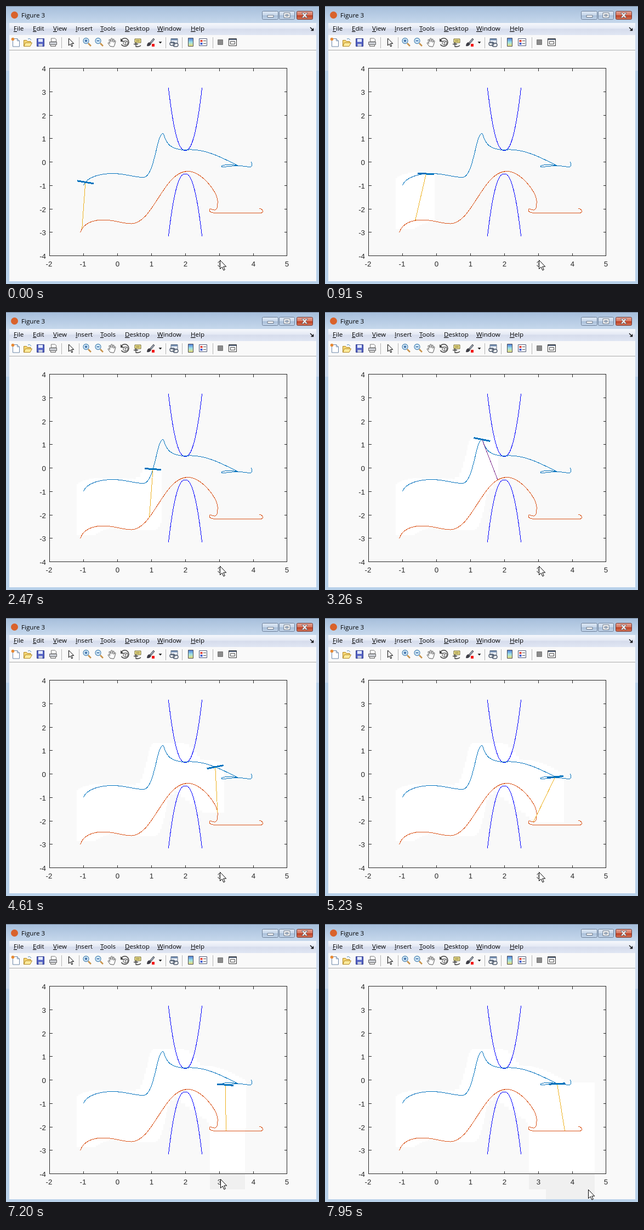
Write an HTML page that moves like this. It is 571 px wide and 507 px high and loops after 8000 ms.

```html
<!DOCTYPE html>
<html lang="en">
<head>
<meta charset="utf-8">
<title>Figure 3</title>
<style>
  html, body { margin: 0; width: 100%; height: 100%; overflow: hidden; background: #b9d1ea; }
  svg { display: block; width: 571px; height: 507px; }
  .ui { font: 11.6px "Open Sans", "Noto Sans", sans-serif; fill: #000; }
  .ui tspan { text-decoration: underline; }
  .tick { font: 13.3px "Liberation Sans", Arial, sans-serif; fill: #262626; }
  .crisp { shape-rendering: crispEdges; }
  .line { fill: none; stroke-width: 1; }
</style>
</head>
<body>
<svg id="stage" viewBox="0 0 571 507" xmlns="http://www.w3.org/2000/svg">
  <defs>
    <linearGradient id="title" x2="0" y2="1">
      <stop offset="0" stop-color="#a6bedb"/><stop offset="1" stop-color="#c6d8ec"/>
    </linearGradient>
    <linearGradient id="menu" x2="0" y2="1">
      <stop offset="0" stop-color="#f6f8fc"/><stop offset=".45" stop-color="#e4e9f4"/>
      <stop offset=".5" stop-color="#d6dcec"/><stop offset="1" stop-color="#e0e6f3"/>
    </linearGradient>
    <linearGradient id="glass" x2="0" y2="1">
      <stop offset="0" stop-color="#dfe9f5"/><stop offset=".48" stop-color="#c6d6e9"/>
      <stop offset=".52" stop-color="#a9bfd9"/><stop offset="1" stop-color="#c3d5ea"/>
    </linearGradient>
    <linearGradient id="close" x2="0" y2="1">
      <stop offset="0" stop-color="#e7a597"/><stop offset=".48" stop-color="#d37660"/>
      <stop offset=".52" stop-color="#bd3e22"/><stop offset="1" stop-color="#d4765a"/>
    </linearGradient>
    <linearGradient id="bar" x2="0" y2="1">
      <stop offset="0" stop-color="#4a78d8"/><stop offset=".5" stop-color="#9be0e8"/>
      <stop offset="1" stop-color="#f0e070"/>
    </linearGradient>
    <clipPath id="client"><path d="M6 81H566V502H6z"/></clipPath>
    <clipPath id="box"><path d="M79 113H513V456H79z"/></clipPath>
  </defs>

  <!-- window -->
  <path fill="#b9d1ea" d="M0 0H571V507H0z"/>
  <path fill="#cddbee" d="M0 30H6V118H0zM566 30h5V118h-5z"/>
  <path fill="url(#title)" d="M0 0H571V31H0z"/>
  <path fill="#6f7f92" d="M0 0H571V1H0z"/>
  <circle cx="15.5" cy="16.5" r="6.5" fill="#d9622b"/>
  <text class="ui" x="28" y="21">Figure 3</text>
  <g stroke="#6d7f98">
    <rect x="467.5" y="9.5" width="29" height="15" rx="2" fill="url(#glass)"/>
    <rect x="498.5" y="9.5" width="28" height="15" rx="2" fill="url(#glass)"/>
    <rect x="530.5" y="9.5" width="29" height="15" rx="2" fill="url(#close)" stroke="#713a35"/>
  </g>
  <g fill="#fff" stroke="#4b5668" stroke-width=".8">
    <path d="M477 17h11v3.5h-11z"/>
    <path fill-rule="evenodd" d="M507 12.5h11v9h-11zM510 15.5v3h5v-3z"/>
    <path d="M539.5 12.5h3.4l2 2.4 2-2.4h3.4l-3.6 4.4 3.6 4.4h-3.4l-2-2.4-2 2.4h-3.4l3.6-4.4z"/>
  </g>
  <path fill="url(#menu)" d="M6 31H566V53H6z"/>
  <path fill="#f9f9f9" d="M6 53H566V502H6z"/>
  <path fill="#a9a9a9" d="M6 80H566V81H6z"/>
  <g id="menus" class="ui"></g>
  <path d="M555 39l5 5M560.5 40.5v4h-4" fill="none" stroke="#000" stroke-width="1.3"/>

  <!-- toolbar -->
  <path class="crisp line" stroke="#b4b4b4" d="M101.5 57v20M133.5 57v20M291.5 57v20M321.5 57v20M377.5 57v20"/>
  <g stroke-linejoin="round">
    <path d="M12.5 59.5h8l4 4v10.5h-12z" fill="#fff" stroke="#6d87a8"/>
    <path d="M20.5 59.5v4h4" fill="none" stroke="#6d87a8"/>
    <circle cx="12.5" cy="60.5" r="2.8" fill="#e78a35"/>
    <path d="M32.5 73.5v-11h5l1.5 2h6v3" fill="#f7d774" stroke="#b08725"/>
    <path d="M32.5 73.5l3-6.5h12l-3.5 6.5z" fill="#ffeb9c" stroke="#b08725"/>
    <path d="M40 60q4-2 6 2" fill="none" stroke="#4d87b8"/>
    <path d="M56.5 59.5h13v14h-13z" fill="#5462c4" stroke="#2d3887"/>
    <path d="M59 60h8v5.5h-8z" fill="#e5ecff"/><path d="M59.5 69h7v4.5h-7z" fill="#c9cfdf"/>
    <path d="M82.5 65v-6h7l2 2v4z" fill="#fff" stroke="#777"/>
    <path d="M79.5 65.5h13v5h-13z" fill="#c9ccd2" stroke="#666"/>
    <path d="M81.5 70.5h9v3h-9z" fill="#eee" stroke="#666"/>
    <path d="M114.5 59v13l3-2.8 2.3 4.8 1.9-.9-2.3-4.7h4.3z" fill="#fff" stroke="#000"/>
  </g>
  <g fill="none">
    <path d="M150 68l5 5M172 68l5 5" stroke="#c8924a" stroke-width="2.6"/>
    <g fill="#d7edfb" stroke="#5a8db8" stroke-width="1.3"><circle cx="146" cy="63.5" r="5"/><circle cx="168" cy="63.5" r="5"/></g>
    <path d="M143.5 63.5h5M146 61v5M165.5 63.5h5" stroke="#245a9a" stroke-width="1.5"/>
    <path d="M190 73.5l-4-6q1-2 3.5 1l-1.5-7q1.5-1.5 2.5 1l1 3v-6q1.5-1.5 2.5 0l.3 6 1-5q1.5-1 2 .8l-.5 5 1.7-3q1.5-.5 1.5 1l-2 7-1.5 3z" fill="#fff" stroke="#555"/>
    <path d="M211 61.5a7.3 7.3 0 1 1 -.5 8.5" stroke="#444" stroke-width="1.6"/>
    <path d="M209 59v6h6z" fill="#444"/>
    <path d="M214 64.5l4-1.5 4 1.5v4.5l-4 2-4-2zM214 64.5l4 1.5 4-1.5M218 66v5" stroke="#555"/>
    <path d="M235 60h11v7h-11z" fill="#f7e98d" stroke="#6b6330"/>
    <path d="M237 62.5h7M237 64.5h7" stroke="#6b6330" stroke-width=".8"/>
    <path d="M233 69.5h8M237 66v8q6 1 9-2" stroke="#333" stroke-width="1.3"/>
    <path d="M263 66l6-7 2 2-6 7z" fill="#9aa5b6" stroke="#444"/>
    <path d="M257 73q0-6 5-7l3 3q-2 5-8 4z" fill="#3d3d46"/>
    <path d="M266 69h5v5h-5z" fill="#f21818"/>
    <path d="M278.5 65h6l-3 3.5z" fill="#222"/>
    <path d="M301 59.5h12v8h-12z" fill="#e9eef6" stroke="#59687d"/><path d="M301 60h12v2.5h-12z" fill="#6e89ad"/>
    <path d="M299 69q0-3 3-3h3q3 0 3 3t-3 3h-3q-3 0-3-3M305 71q0-3 3-3h3q3 0 3 3t-3 3h-3q-3 0-3-3" stroke="#4f5b6d" stroke-width="1.4"/>
    <path d="M332.5 58.5h9v15h-9z" fill="url(#bar)" stroke="#4d4d55"/>
    <path d="M352.5 59.5h14v13h-14z" fill="#fff" stroke="#4e5876"/>
    <path d="M354.5 62h4v3.5h-4z" fill="#e03c31"/><path d="M354.5 67h4v3.5h-4z" fill="#3858cf"/>
    <path d="M360 63.5h5M360 68.5h5" stroke="#555"/>
    <path d="M386.5 61.5h9v9h-9z" fill="#8b8b8b" stroke="#777"/>
    <path d="M406.5 59.5h14v13h-14z" fill="#fff" stroke="#333"/>
    <path d="M407 60h13v2h-13z" fill="#56657d"/>
    <path d="M409.5 64.5h8v5h-8z" stroke="#444"/>
  </g>

  <!-- figure -->
  <g class="crisp">
    <path id="greyTrail" fill="#f0f0f0" clip-path="url(#client)"/>
    <path id="whiteTrail" fill="#fff" clip-path="url(#box)"/>
    <path id="axes" class="line" stroke="#262626"/>
  </g>
  <g id="labels" class="tick"></g>
  <g class="crisp" transform="translate(.5 .5)">
    <path id="walls" class="line" stroke="#00f"/>
    <path id="craftPath" class="line" stroke="#0072bd"/>
    <path id="loadPath" class="line" stroke="#d95319"/>
    <path id="cable" class="line"/>
    <path id="craft" fill="none" stroke="#0072bd" stroke-width="3"/>
  </g>
  <path id="pointer" d="M.5.5v16l3.7-3.5 2.7 6 2.4-1.1-2.6-5.7h5z" fill="#fff" stroke="#000"/>
</svg>
<script>
const $ = id => document.getElementById(id);
const set = (id, name, value) => $(id).setAttribute(name, value);
const LOOP = 8000, FIRST = 120, GAP = 105.4, LAST = 75;
const UNIT_X = 61.857, UNIT_Y = 42.75;

// menu bar
$("menus").innerHTML = [["File", 14], ["Edit", 49], ["View", 86], ["Insert", 127],
  ["Tools", 172], ["Desktop", 217], ["Window", 276], ["Help", 337]]
  .map(([s, x]) => `<text x="${x}" y="45"><tspan>${s[0]}</tspan>${s.slice(1)}</text>`).join("");

// axes
let frame = "M79.5 113.5H512.5V455.5H79.5Z", labels = "";
for (let x = -2; x <= 5; x++) {
  const p = Math.round(79.4 + UNIT_X * (x + 2)) + .5;
  frame += `M${p} 113.5v5M${p} 455.5v-5`;
  labels += `<text x="${p - (x < 0 ? 1 : 0)}" y="474.5" text-anchor="middle">${x}</text>`;
}
for (let y = -4; y <= 4; y++) {
  const p = Math.floor(113.5 + UNIT_Y * (4 - y)) + .5;
  frame += `M79.5 ${p}h5M512.5 ${p}h-5`;
  labels += `<text x="73" y="${p + 5}" text-anchor="end">${y}</text>`;
}
set("axes", "d", frame);
$("labels").innerHTML = labels;

// the two walls of the gap
const wall = (base, dir) => "M" + Array.from({ length: 41 }, (_, i) => {
  const s = i / 20 - 1;
  return `${326.5 + 30.6 * s} ${base + dir * 114 * Math.abs(s) ** 2.3}`;
}).join("L");
set("walls", "d", wall(263, -1) + wall(305.5, 1));

// a chain of cubic curves; knots give the step at which each curve begins
function track(id, d, knots) {
  set(id, "d", d);
  const n = d.match(/[\d.]+/g).map(Number);
  return step => {
    let i = 0;
    while (i < knots.length - 2 && step > knots[i + 1]) i++;
    const t = (step - knots[i]) / (knots[i + 1] - knots[i]), u = 1 - t;
    return [0, 1].map(k => {
      const [a, b, c, e] = [0, 2, 4, 6].map(j => n[6 * i + j + k]);
      return u * u * u * a + 3 * u * u * t * b + 3 * u * t * t * c + t * t * t * e;
    });
  };
}

const craftAt = track("craftPath",
  `M141 326.5 C147 311 172 305 195 305 C217 305 233 312 250 312
   C271 312 274 232 286 232 C290 232 286 262 327 262
   C362 257.5 400 279.5 422 290.5 C421 290 398 287 392.5 291.5
   C392 295 405 291 423 291 C433 291 440 293 445 293 C448 293 449.5 289 447 284`,
  [-1.5, 9.8, 18.7, 30, 36, 49.5, 62, 75]);

const loadAt = track("loadPath",
  `M135 413 C140 396 158 389.5 177 389.5 C197 389.5 212 396.5 228 396.5
   C268 396.5 287 301 331 301 C356 301 384 337 385.5 354
   C387 386 371 363 370.5 371.5 C370 378 385 377.5 401 377
   C413 376.5 425 376.5 437 376.5 C446 376.5 455 377 463 377 C472 377 468 369 461 369`,
  [-2, 11, 19, 31.7, 43, 56, 68, 75]);

// how far the right tip of the craft dips: [step, pixels]
const tilt = [[0, 2.5], [16, -1], [30, 3], [43, -3], [56, .5], [68, 1.2], [75, -.7]];
function mix(table, x) {
  const i = Math.max(1, table.findIndex(p => p[0] >= x));
  const [x0, y0] = table[i - 1], [x1, y1] = table[i];
  return y0 + (y1 - y0) * (x - x0) / (x1 - x0);
}

const HALF = 15;
const pointerAt = step => step < 53 ? [390, 463] : step < LAST ? [391, 465] : [480, 484];

const poses = Array.from({ length: LAST + 1 }, (_, step) => {
  const [x, y] = craftAt(step), [lx, ly] = loadAt(step), t = mix(tilt, step);
  const slack = Math.hypot((lx - x) / UNIT_X, (ly - y) / UNIT_Y) < 1.85;
  return {
    craft: `M${x - HALF} ${y - t}L${x + HALF} ${y + t}`,
    cable: `M${x} ${y}L${lx} ${ly}`,
    colour: slack ? "#7e2f8e" : "#edb120",
    pointer: pointerAt(step),
    box: [Math.min(x - HALF, lx), y - Math.abs(t) - 1, Math.max(x + HALF, lx) + 1, ly + 1]
  };
});

// the repainted area grows by the box around each change
const join = (a, b) => a.map((v, k) => k < 2 ? Math.min(v, b[k]) : Math.max(v, b[k]));
let trail = "";
poses.forEach((p, i) => {
  if (i) {
    const last = poses[i - 1], [px, py] = p.pointer;
    let area = join(last.box, p.box);
    if (px !== last.pointer[0]) area = join(area, [px, py, px + 12, py + 19]);
    const [x0, y0, x1, y1] = area.map((v, k) => k < 2 ? Math.floor(v) : Math.ceil(v));
    trail += `M${x0} ${y0}H${x1}V${y1}H${x0}Z`;
  }
  p.trail = trail;
});

let shown = -1;
function draw(ms) {
  const step = ms < FIRST ? 0 : Math.min(LAST, 1 + Math.floor((ms - FIRST) / GAP));
  if (step === shown) return;
  shown = step;
  const p = poses[step];
  set("greyTrail", "d", p.trail);
  set("whiteTrail", "d", p.trail);
  set("craft", "d", p.craft);
  set("cable", "d", p.cable);
  set("cable", "stroke", p.colour);
  set("pointer", "transform", `translate(${p.pointer})`);
}

const start = performance.now();
function tick() {
  draw((performance.now() - start) % LOOP);
  requestAnimationFrame(tick);
}
draw(0);
requestAnimationFrame(tick);
</script>
</body>
</html>
```
